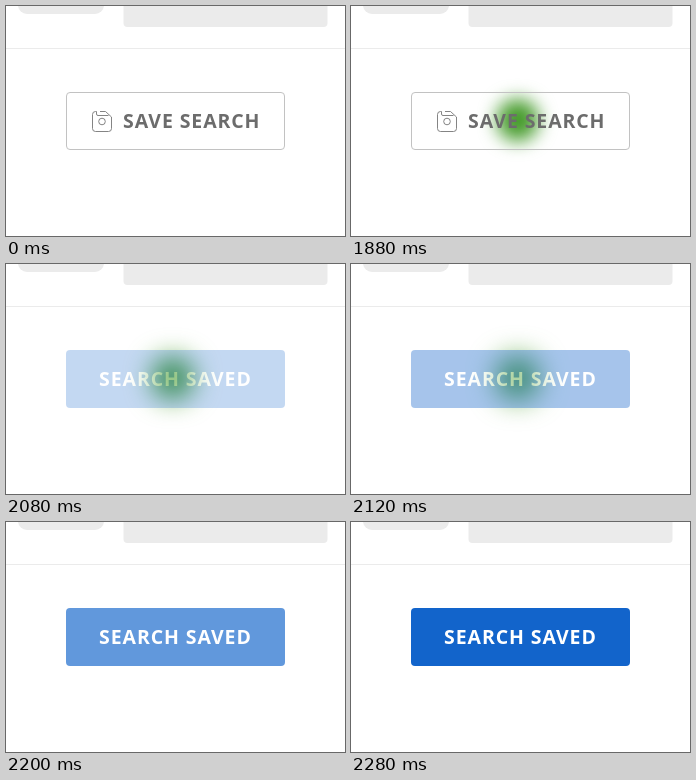
Write an HTML page that moves like this. It is 339 px wide and 230 px high and loops after 4080 ms.

```html
<!DOCTYPE html>
<html lang="en">
<head>
<meta charset="utf-8">
<title>Save search button</title>
<style>
  html, body { margin: 0; width: 100%; height: 100%; overflow: hidden; background: #fff; }
  svg { display: block; width: 100%; height: 100%; }
  text { font: 700 19.5px "Noto Sans", sans-serif; letter-spacing: .9px; }
</style>
</head>
<body>
<svg viewBox="0 0 339 230">
  <defs>
    <filter id="soft" filterUnits="userSpaceOnUse" x="90" y="40" width="153" height="150" color-interpolation-filters="sRGB">
      <feGaussianBlur id="blur" stdDeviation="1"/>
    </filter>
  </defs>

  <g fill="#ebebeb">
    <rect x="12" y="-30" width="86" height="38" rx="9"/>
    <rect x="117.5" y="-30" width="204" height="51" rx="4"/>
    <rect y="42" width="339" height="1"/>
  </g>

  <circle id="ripple" cx="166.7" cy="114.1" r="21.2" fill="#469b2c" filter="url(#soft)"/>

  <g id="idle">
    <rect x="60.5" y="86.5" width="218" height="57" rx="3.5" fill="none" stroke="#c2c2c2"/>
    <g fill="none" stroke="#777" stroke-width=".9">
      <path d="M94 105.5H99.5L105.5 111V122.5a3 3 0 0 1-3 3H89.5a3 3 0 0 1-3-3V108.5a3 3 0 0 1 3-3h1V108a1.5 1.5 0 0 0 1.5 1.5h10.5"/>
      <circle cx="96" cy="115.5" r="3.3"/>
    </g>
    <text x="117.1" y="122" fill="#6c6c6c">SAVE SEARCH</text>
  </g>

  <g id="saved">
    <rect x="60" y="86" width="219" height="58" rx="4" fill="#1264cb"/>
    <text x="93.1" y="122" fill="#fff">SEARCH SAVED</text>
  </g>
</svg>
<script>
  const LOOP = 4080, STEP = 40;
  const PRESS = 1640, FADE = 1960, RELEASE = 2160, DONE = 2280;
  const [ripple, blur, idle, saved] =
    ["ripple", "blur", "idle", "saved"].map(id => document.getElementById(id));

  const progress = (t, from, to) => Math.min(1, Math.max(0, (t - from) / (to - from)));

  function draw(time) {
    const t = Math.floor((time % LOOP) / STEP) * STEP;
    const pressed = t >= PRESS && t < RELEASE;
    ripple.setAttribute("visibility", pressed ? "visible" : "hidden");
    blur.setAttribute("stdDeviation", 1 + 14 * progress(t, PRESS, RELEASE) ** 0.75);
    idle.setAttribute("opacity", 1 - progress(t, FADE, 2080));
    saved.setAttribute("opacity", progress(t, FADE, DONE) ** 1.43);
  }

  const start = performance.now();
  function tick() {
    draw(performance.now() - start);
    requestAnimationFrame(tick);
  }
  tick();
</script>
</body>
</html>
```
